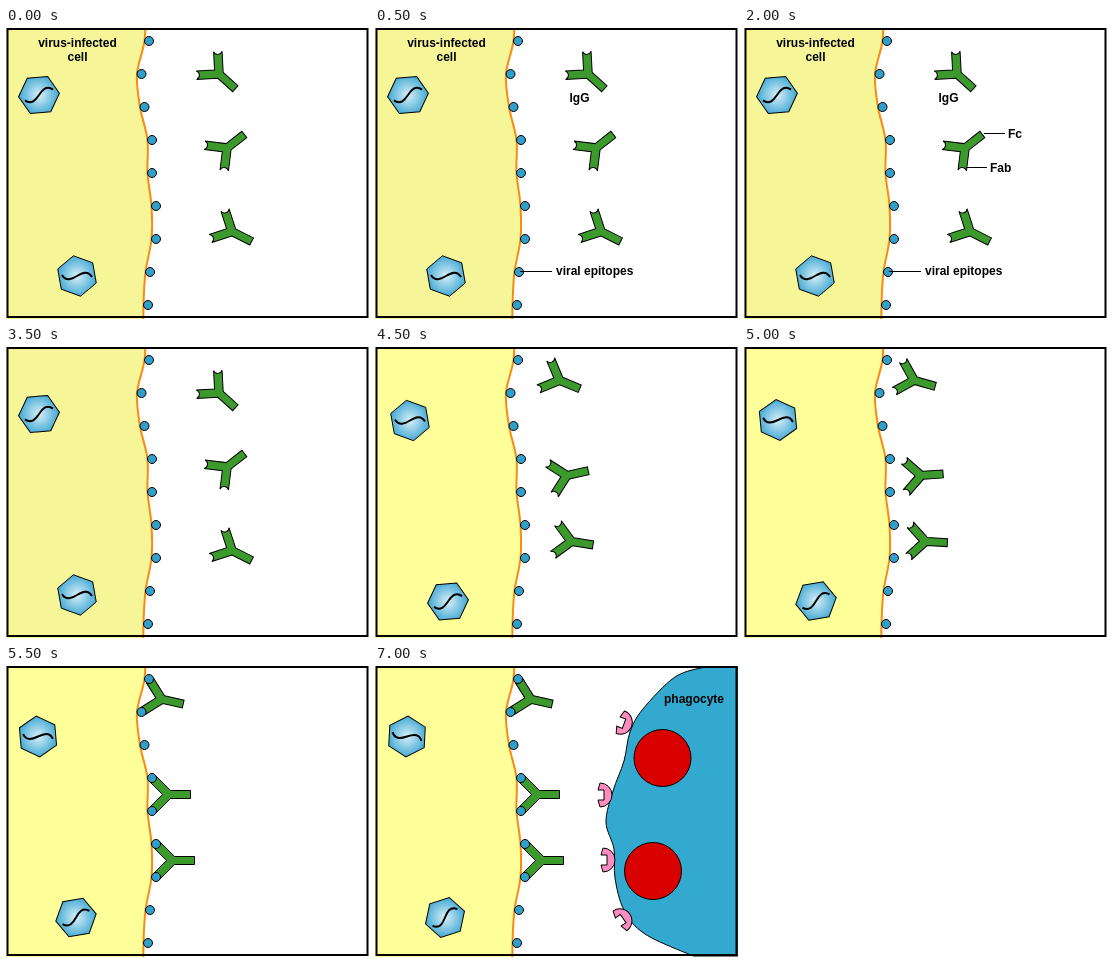
Recreate the animation shown at these times as an HTML page. Size 363 by 291 pixels, loop 8 s.

```html
<!DOCTYPE html>
<html lang="en">
<head>
<meta charset="utf-8">
<title>Antibodies binding an infected cell</title>
<style>
  html, body { margin: 0; width: 100%; height: 100%; overflow: hidden; background: #fff; }
  svg { display: block; width: 100%; height: 100%; }
  text { font: bold 12px "Liberation Sans", Arial, sans-serif; }
  .ink { stroke: #000; stroke-width: 1; }
</style>
</head>
<body>
<svg viewBox="0 0 363 291">
  <defs>
    <radialGradient id="shine">
      <stop offset="0" stop-color="#d8f0f8"/>
      <stop offset="1" stop-color="#46aad4"/>
    </radialGradient>
    <g id="virus">
      <path id="capsid" class="ink" fill="url(#shine)"/>
      <path d="M-15 -1C-11 6 -5 3 0 0S11 -6 15 1" fill="none" stroke="#000" stroke-width="2"/>
    </g>
    <!-- Fc arm points right, the two Fab arms end in cups -->
    <path id="antibody" class="ink" fill="#3c9a2d" d="M2 -4H22V4H2L-13 19A4.5 4.5 0 0 0 -19 13L-6 0L-19 -13A4.5 4.5 0 0 0 -13 -19Z"/>
    <path id="receptor" class="ink" fill="#ff8cc0" d="M-5 -12A12 12 0 0 1 -5 12L-7 5H-1V-5H-7Z"/>
  </defs>

  <path id="cell"/>
  <path id="membrane" fill="none" stroke="#f98b13" stroke-width="2"/>
  <g id="movers"></g>
  <g id="epitopes" class="ink" fill="#329fcb"></g>

  <g id="title" text-anchor="middle">
    <text x="71.500" y="19">virus-infected</text>
    <text x="71.500" y="33">cell</text>
  </g>
  <g id="names">
    <text x="194.500" y="74">IgG</text>
    <text x="181" y="247">viral epitopes</text>
    <path class="ink" d="M145 243.500H177"/>
  </g>
  <g id="parts">
    <text x="264" y="110">Fc</text>
    <text x="246" y="144">Fab</text>
    <path class="ink" d="M240 105.500H261M222 139.500H243"/>
  </g>

  <g id="phagocyte">
    <path id="body" class="ink" fill="#33a9cf"/>
    <use href="#receptor" transform="translate(250 58) rotate(20)"/>
    <use href="#receptor" transform="translate(230 129)"/>
    <use href="#receptor" transform="translate(233 194)"/>
    <use href="#receptor" transform="translate(249 252) rotate(-35)"/>
    <circle class="ink" cx="287.500" cy="92" r="28.500" fill="#d90000"/>
    <circle class="ink" cx="278" cy="205" r="28.500" fill="#d90000"/>
    <text x="289" y="37">phagocyte</text>
  </g>
  <rect x="1.500" y="1" width="360" height="288" fill="none" stroke="#000" stroke-width="2"/>
</svg>
<script>
const LOOP = 8000, STEP = 500;
const APPROACH_START = 3500, APPROACH_TIME = 2000, PHAGOCYTE_TIME = 7000;
const DOT_RADIUS = 4.5;
const $ = id => document.getElementById(id);
const mix = (a, b, k) => a + (b - a) * k;
const degrees = radians => radians * 180 / Math.PI;

function add(parent, tag, attributes) {
  const node = document.createElementNS("http://www.w3.org/2000/svg", tag);
  for (const [key, value] of Object.entries(attributes)) node.setAttribute(key, value);
  return parent.appendChild(node);
}

// Catmull-Rom curve through the points
function smooth(points) {
  const at = i => points[Math.max(0, Math.min(points.length - 1, i))];
  const control = (i, side) => at(i).map((v, k) => v + side * (at(i + 1)[k] - at(i - 1)[k]) / 6);
  return points.slice(1).reduce(
    (path, point, i) => `${path}C${[control(i, 1), control(i + 1, -1), point].join(" ")}`,
    `M${points[0]}`);
}

const corners = Array.from({ length: 6 }, (_, i) => {
  const angle = (20 + 60 * i) * Math.PI / 180;
  return `${20.5 * Math.cos(angle)} ${20.5 * Math.sin(angle)}`;
});
$("capsid").setAttribute("d", `M${corners.join("L")}Z`);

// Evenly spaced epitopes sit on the outside of the membrane.
const epitopes = [143, 135.5, 138.5, 146, 146, 150, 150, 144, 142].map((x, i) => [x, 13 + 33 * i]);
for (const [cx, cy] of epitopes) add($("epitopes"), "circle", { cx, cy, r: DOT_RADIUS });

const membrane = smooth([[139.5, -20], ...epitopes.map(([x, y]) => [x - DOT_RADIUS, y]), [137.5, 310]]);
$("membrane").setAttribute("d", membrane);
$("cell").setAttribute("d", `${membrane}H0V-20Z`);
$("body").setAttribute("d", smooth([[330, 1], [300, 11], [268, 43], [255, 66], [249, 95], [238, 125],
  [231, 156], [239, 183], [240, 212], [249, 244], [270, 268], [318, 290]]) + "H363V1Z");

function place(node, x, y, angle) {
  node.setAttribute("transform", `translate(${x} ${y}) rotate(${angle})`);
}

// Viruses drift together and spin in opposite directions.
function makeVirus(x, y, angle, spin) {
  const node = add($("movers"), "use", { href: "#virus" });
  return (p, later) => {
    const swing = Math.sin(Math.PI * p);
    const turn = 30 * p + 10 * swing + 8 * later;
    place(node, x - p + 2.5 * swing, y + 3.5 * p + 4.75 * swing, angle + spin * turn);
  };
}

// An antibody ends with its Fab arms on an epitope and the next one.
function makeAntibody(x, y, angle, first) {
  const node = add($("movers"), "use", { href: "#antibody" });
  const [[x1, y1], [x2, y2]] = epitopes.slice(first, first + 2);
  const boundX = (x1 + x2) / 2 + (y2 - y1) / 2;
  const boundY = (y1 + y2) / 2 + (x1 - x2) / 2;
  const boundAngle = degrees(Math.atan2(x1 - x2, y2 - y1));
  return p => place(node,
    mix(x, boundX, p),
    mix(y, boundY, Math.min(1, 2 * p)),
    mix(angle, boundAngle, 1 - (1 - p) ** 1.6));
}

const movers = [
  makeVirus(33, 67, -25, 1),
  makeVirus(71, 248, 0, -1),
  makeAntibody(213, 46, 42, 0),
  makeAntibody(221, 120, -38, 3),
  makeAntibody(226, 203.5, 27, 5),
];

function show(id, visible) {
  $(id).style.display = visible ? "" : "none";
}

function draw(now) {
  const t = Math.floor(now % LOOP / STEP) * STEP;
  const progress = Math.max(0, Math.min(1, (t - APPROACH_START) / APPROACH_TIME));
  const later = t >= PHAGOCYTE_TIME;
  for (const move of movers) move(progress, later);
  $("cell").setAttribute("fill", t < 4500 ? "#f6f698" : "#ffff99");
  show("title", t < APPROACH_START);
  show("names", t >= 500 && t < APPROACH_START);
  show("parts", t >= 2000 && t < APPROACH_START);
  show("phagocyte", later);
}

const startTime = performance.now();
function tick() {
  draw(performance.now() - startTime);
  requestAnimationFrame(tick);
}
tick();
</script>
</body>
</html>
```
